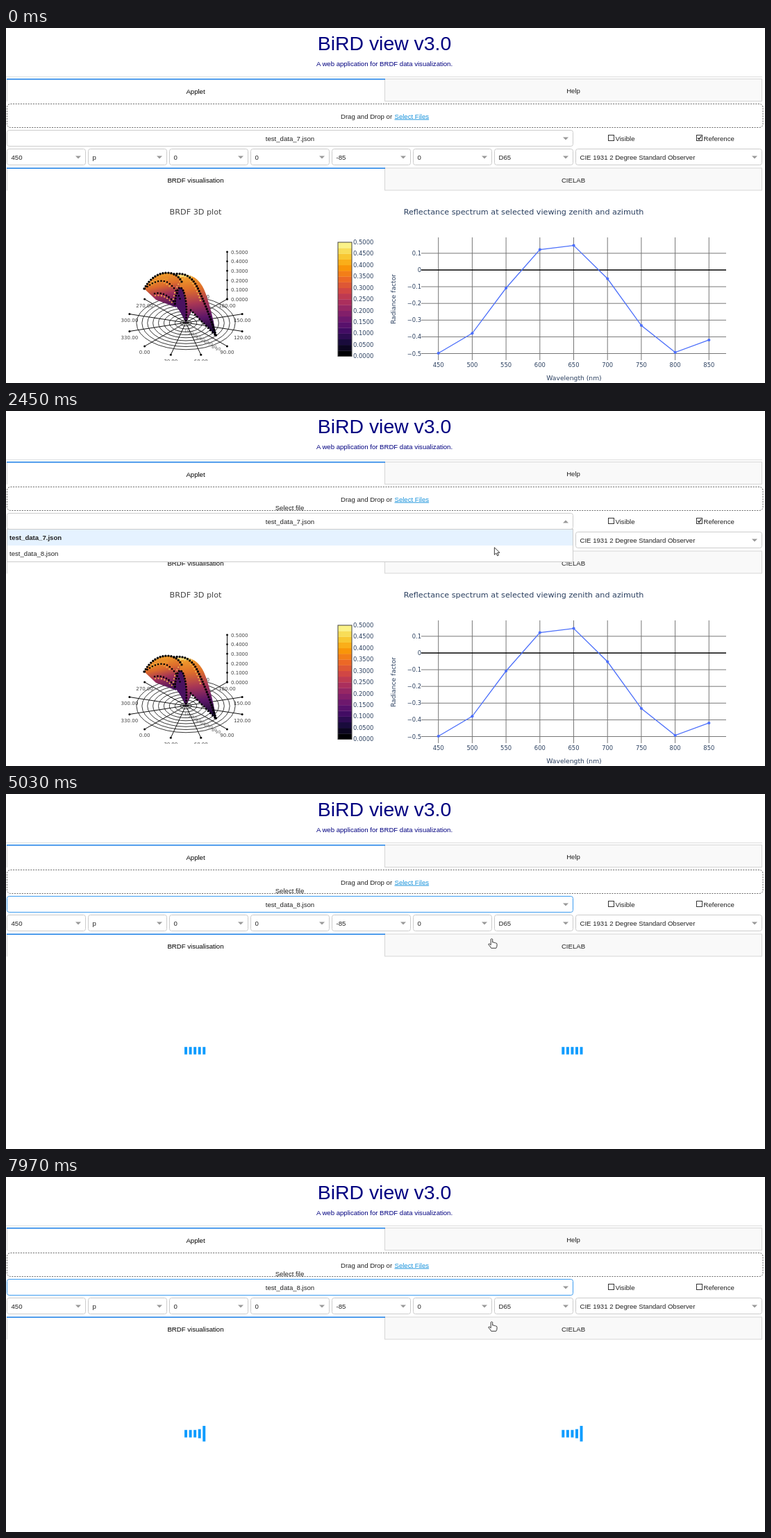
Write an HTML page that moves like this. It is 1093 px wide and 512 px high and loops after 8000 ms.

```html
<!DOCTYPE html>
<html lang="en">
<head>
<meta charset="utf-8">
<title>BiRD view</title>
<style>
  html, body { margin: 0; width: 100%; height: 100%; overflow: hidden; background: #fff; }
  svg { display: block; width: 1093px; height: 512px; }
  text { font: 9.6px "Liberation Sans", Arial, sans-serif; fill: #222; white-space: pre; }
  .mid { text-anchor: middle; }
  .end { text-anchor: end; }
  .plot text { font-family: "DejaVu Sans", Verdana, sans-serif; font-size: 8.4px; fill: #2a3f5f; }
  .plot text.title { font-size: 11.2px; }
  .plot text.axis { font-size: 9.2px; }
  .plot text.small { font-size: 7px; fill: #444; }
  .plot text.tiny { font-size: 6px; fill: #666; }
  .select { fill: #fff; stroke: #ccc; }
  .select.focus { stroke: #3c9cf0; }
  .arrow { fill: #999; }
</style>
</head>
<body>
<svg viewBox="0 0 1093 512">
  <defs>
    <linearGradient id="leftHeat" x1="226" y1="352" x2="238" y2="404" gradientUnits="userSpaceOnUse">
      <stop offset="0" stop-color="#f3a52a"/>
      <stop offset=".35" stop-color="#dd6b2c"/>
      <stop offset=".6" stop-color="#a03058"/>
      <stop offset="1" stop-color="#3c0f5c"/>
    </linearGradient>
    <linearGradient id="rightHeat" x1="268" y1="354" x2="280" y2="440" gradientUnits="userSpaceOnUse">
      <stop offset="0" stop-color="#f3a52a"/>
      <stop offset=".25" stop-color="#e0702a"/>
      <stop offset=".5" stop-color="#a83655"/>
      <stop offset=".75" stop-color="#5c1668"/>
      <stop offset="1" stop-color="#170a30"/>
    </linearGradient>
    <clipPath id="scene"><rect x="150" y="290" width="240" height="190"/></clipPath>
  </defs>
  <g id="page"></g>
  <g id="plots" class="plot"></g>
  <g id="spinners" fill="#119dff"></g>
  <g id="menu">
    <rect x="1.5" y="170.5" width="815" height="47" fill="#fff" stroke="#ccc"/>
    <rect id="hover" x="2" y="171" width="814" height="23" fill="#e5f2ff"/>
    <text x="5" y="186" style="font-weight:bold">test_data_7.json</text>
    <text x="5" y="209">test_data_8.json</text>
  </g>
  <circle id="click" r="9.7" fill="#fdf24a" opacity=".8"/>
  <g id="cursor" stroke="#222" stroke-width=".9" fill="#fff" stroke-linejoin="round">
    <path id="pointer" d="M0 0V10.5L2.5 8.2L4.2 12L6 11.2L4.3 7.5H7.6Z"/>
    <path id="hand" d="M-1.3 1Q0-.7 1.2 1V5.5Q2.8 4.7 3.6 6Q5 5.3 5.8 6.6Q7.5 6.2 7.5 8V10.5Q7.3 12.4 6.3 13.8H-.8Q-2 11.6-4.7 8.6Q-4.5 6.8-2.9 7.8L-1.3 9.3Z"/>
  </g>
</svg>
<script>
const byId = id => document.getElementById(id);
const page = byId("page"), plots = byId("plots"), spinners = byId("spinners");

function add(parent, tag, attrs, content) {
  const node = document.createElementNS("http://www.w3.org/2000/svg", tag);
  for (const key in attrs) node.setAttribute(key, attrs[key]);
  if (content !== undefined) node.textContent = content;
  return parent.appendChild(node);
}
const label = (parent, x, y, content, attrs = {}) => add(parent, "text", { x, y, ...attrs }, content);
const stroke = (parent, d, color, width = 1, attrs = {}) =>
  add(parent, "path", { d, fill: "none", stroke: color, "stroke-width": width, ...attrs });
const mid = { class: "mid" };

// Page chrome
label(page, 545, 31.5, "BiRD view v3.0", { class: "mid", style: "font-size:28.4px;fill:#000080" });
label(page, 545, 54.5, "A web application for BRDF data visualization.", { class: "mid", style: "fill:#000080" });
stroke(page, "M0 70.5H1089", "#ddd");

function tabs(y, left, right) {
  add(page, "rect", { x: 545.5, y: y + .5, width: 543, height: 32, fill: "#f9f9f9", stroke: "#d6d6d6" });
  stroke(page, `M1.5 ${y}v33`, "#d6d6d6");
  add(page, "rect", { x: 1, y, width: 545, height: 1.5, fill: "#1a7ee6" });
  label(page, 273, y + 21.7, left, { class: "mid", style: "fill:#000" });
  label(page, 817, y + 21.3, right, mid);
}
tabs(73, "Applet", "Help");
tabs(201.5, "BRDF visualisation", "CIELAB");

add(page, "rect", { x: 1.5, y: 109.5, width: 1088.5, height: 34, rx: 5, fill: "none", stroke: "#444", "stroke-width": .8, "stroke-dasharray": "2 1.6" });
label(page, 482, 130.5, "Drag and Drop or");
label(page, 559.5, 130.5, "Select Files", { style: "fill:#1b94dc;text-decoration:underline" });
const hint = label(page, 408.5, 143, "Select file", mid);

function select(x, y, width, value) {
  const box = add(page, "rect", { x: x + .5, y: y + .5, width, height: 23, rx: 3, class: "select" });
  const arrow = add(page, "path", { d: "M-4-2H4L0 2Z", class: "arrow", transform: `translate(${x + width - 10} ${y + 12.5})` });
  const text = label(page, x + 6.5, y + 15.5, value);
  return { box, arrow, text };
}
const fileSelect = select(1, 147, 815, "");
fileSelect.text.setAttribute("class", "mid");
fileSelect.text.setAttribute("x", 409);
["450", "p", "0", "0", "-85", "0", "D65"].forEach((value, i) => select(1 + 117 * i, 174, 113, value));
select(820, 174, 268, "CIE 1931 2 Degree Standard Observer");

function checkbox(x, name) {
  add(page, "rect", { x, y: 154.5, width: 8, height: 8, fill: "#fff", stroke: "#333" });
  label(page, x + 10, 163, name);
}
checkbox(867.5, "Visible");
checkbox(994.5, "Reference");
const tick = stroke(page, "M996.3 158.5L998 160.7L1001.2 156", "#222", 1.3);

// Polar scene
const CX = 259, CY = 425, RX = 84, RY = 48;
label(plots, 273, 269, "BRDF 3D plot", { class: "mid title", style: "fill:#444" });
const scene = add(plots, "g", { "clip-path": "url(#scene)" });
for (let deg = 0; deg < 360; deg += 30) {
  const angle = (135 - deg) * Math.PI / 180;
  const x = CX + RX * Math.cos(angle), y = CY + RY * Math.sin(angle);
  stroke(scene, `M${CX} ${CY}L${x} ${y}`, "#111");
  add(scene, "circle", { cx: x, cy: y, r: 1.5 });
  label(scene, x, y + 11.5, deg.toFixed(2), { class: "mid small" });
}
for (let k = 1; k <= 9; k++) {
  add(scene, "ellipse", { cx: CX, cy: CY + .5, rx: 7.9 * k, ry: 4.25 * k, fill: "none", stroke: "#222", "stroke-width": .9 });
  label(scene, CX + 5.6 * k - 4, CY + 3.2 * k + 11, 10 * k, { class: "mid tiny" });
}
stroke(scene, "M318.5 323V391", "#111");
for (let k = 0; k <= 5; k++) {
  add(scene, "circle", { cx: 318.5, cy: 391 - 13.6 * k, r: 1.4 });
  label(scene, 324, 393.8 - 13.6 * k, (k / 10).toFixed(4), { class: "small" });
}

// Surface with its sampled arcs
const fill = (d, color) => add(scene, "path", { d, fill: color });
fill("M244 357Q276 349 288 384Q297 410 303 445L290 431L267 408L259 425Q250 400 244 385Z", "url(#rightHeat)");
fill("M199 376Q213 353 233 353Q247 353 252 364L247 386L245 403L216 392Z", "url(#leftHeat)");
fill("M244 400Q248 368 254 375Q261 395 259 425Q253 411 244 400Z", "#4a1260");
stroke(scene, "M247 359Q257 355 267 360", "#f9dc78", 3);
stroke(scene, "M208 371Q222 360 234 362", "#e8912c", 3);
const dots = (d, color, width, gap) =>
  stroke(scene, d, color, width, { "stroke-dasharray": `0 ${gap}`, "stroke-linecap": "round" });
dots("M207 369Q220 358 237 374M215 386Q228 383 242 399M241 391Q246 363 262 358M266 365Q275 375 281 397", "#f2b64a", 2.2, 4.5);
dots("M199 376Q212 353 233 353Q247 354 253 366", "#000", 3.4, 4);
dots("M242 355Q262 351 274 371Q288 398 303 445", "#000", 3.4, 4);
dots("M200 376Q218 360 233 367Q246 376 251 392", "#000", 2.6, 4.4);
dots("M214 383Q231 379 246 401", "#000", 2.6, 4.4);
dots("M243 398Q247 365 255 378Q262 396 259 425", "#000", 3, 4);
dots("M266 407L302 444", "#000", 2.8, 4.5);

// Colour bar
const inferno = ["000004", "1b0c41", "4a0c6b", "781c6d", "a52c60", "cf4446", "ed6925", "fb9b06", "f7d13d", "fcffa4"]
  .map(hex => [0, 2, 4].map(i => parseInt(hex.slice(i, i + 2), 16)));
function infernoAt(u) {
  const pos = u * (inferno.length - 1), i = Math.min(inferno.length - 2, Math.floor(pos));
  return `rgb(${inferno[i].map((c, j) => Math.round(c + (inferno[i + 1][j] - c) * (pos - i)))})`;
}
const BANDS = 20, bandHeight = 164.5 / BANDS;
for (let k = 0; k < BANDS; k++)
  add(plots, "rect", { x: 478, y: 473.5 - bandHeight * (k + 1), width: 20, height: bandHeight + .3, fill: infernoAt(k / (BANDS - .4)) });
add(plots, "rect", { x: 478, y: 309, width: 20, height: 164.5, fill: "none", stroke: "#444" });
for (let k = 0; k <= 10; k++) label(plots, 500, 476.3 - 16.45 * k, (k / 20).toFixed(4));

// Spectrum chart
label(plots, 745.5, 269, "Reflectance spectrum at selected viewing zenith and azimuth", { class: "mid title" });
const xAt = i => 622.7 + 48.7 * i, yAt = value => 349 - 241 * value;
for (let i = 0; i < 9; i++) {
  stroke(plots, `M${xAt(i)} 302V479`, "#777");
  label(plots, xAt(i), 489, 450 + 50 * i, mid);
}
for (let k = -5; k <= 1; k++) {
  const y = yAt(k / 10);
  stroke(plots, `M598 ${y}H1037`, k ? "#777" : "#000", k ? 1 : 1.7);
  label(plots, 598, y + 3, String(k / 10).replace("-", "\u2212"), { class: "end" });
}
const spectrum = [-.498, -.379, -.108, .122, .147, -.052, -.332, -.493, -.419];
stroke(plots, "M" + spectrum.map((v, i) => `${xAt(i)} ${yAt(v)}`).join("L"), "#4c6ffa", 1.3);
spectrum.forEach((v, i) => add(plots, "circle", { cx: xAt(i), cy: yAt(v), r: 2.1, fill: "#4c6ffa" }));
label(plots, 818, 508, "Wavelength (nm)", { class: "mid axis" });
label(plots, 0, 0, "Radiance factor", { class: "mid axis", transform: "translate(561 391) rotate(-90)" });

// Loading bars
const bars = [];
for (const left of [257, 800.3])
  for (let i = 0; i < 5; i++)
    bars.push({ i, node: add(spinners, "rect", { x: left + 6.56 * i, width: 4 }) });

// Timeline
const LOOP = 8000, LOADING = 5030, PULSE = 1130;
const clamp = u => Math.min(1, Math.max(0, u));
const smooth = u => u * u * (3 - 2 * u);
const mix = (a, b, u) => a + (b - a) * u;
const show = (node, on) => node.style.display = on ? "" : "none";
const within = (t, from, to) => t >= from && t < to;

function cursorAt(t) {
  if (t < 2110) {
    const u = 1 - (1 - clamp((t - 500) / 670)) ** 2;
    return [mix(1077, 732, u), mix(391, 156, u)];
  }
  const rest = 1 - smooth(clamp((t - 2110) / 550));
  return [mix(699.5, 732, rest ** 1.89), mix(208.5, 156, rest ** 1.33)];
}

function barScale(t, i) {
  const phase = (t - LOADING - i * PULSE / 12 + PULSE) % PULSE / (PULSE / 5);
  return .4 + .6 * smooth(clamp(1 - Math.abs(phase - 1)));
}

function render(t) {
  const open = within(t, 1620, 3110), chosen = t >= 3110, loading = t >= LOADING;
  const [x, y] = cursorAt(t), overRow = t >= 2480;
  show(hint, t >= 1100);
  show(byId("menu"), open);
  byId("hover").setAttribute("y", overRow ? 194 : 171);
  fileSelect.text.textContent = `test_data_${chosen ? 8 : 7}.json`;
  fileSelect.box.classList.toggle("focus", chosen);
  fileSelect.arrow.setAttribute("d", open ? "M-4 2H4L0-2Z" : "M-4-2H4L0 2Z");
  show(tick, t < 3720);
  show(plots, !loading);
  show(spinners, loading);
  for (const { i, node } of bars) {
    const height = 27 * barScale(t, i);
    node.setAttribute("y", 370.2 - height / 2);
    node.setAttribute("height", height);
  }
  const cursor = byId("cursor"), click = byId("click");
  show(cursor, t >= 500);
  show(byId("pointer"), !overRow);
  show(byId("hand"), overRow);
  cursor.setAttribute("transform", `translate(${x} ${y})`);
  show(click, within(t, 1550, 1620) || within(t, 3020, 3110));
  click.setAttribute("cx", x);
  click.setAttribute("cy", y + .5);
}

const start = performance.now();
function frame() {
  render((performance.now() - start) % LOOP);
  requestAnimationFrame(frame);
}
frame();
</script>
</body>
</html>
```
